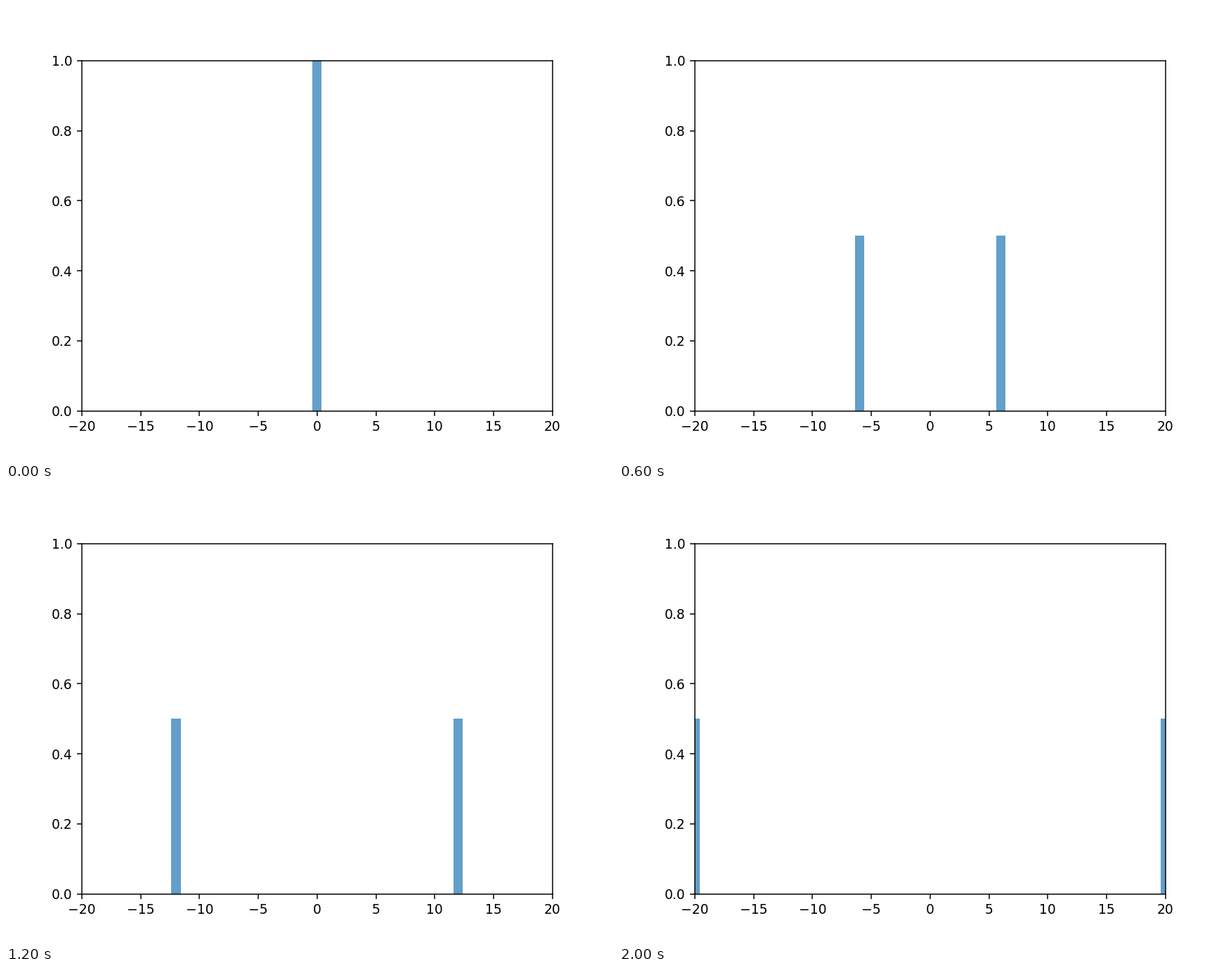
A matplotlib script that plays this animation: 864x648 px, repeating every 2.1 s.

```python
import matplotlib.pyplot as plt
import numpy as np
from matplotlib.animation import FuncAnimation

REACH = 20
STEPS = REACH + 1

plt.rcParams["font.family"] = "DejaVu Sans"
fig, ax = plt.subplots(figsize=(6.4, 4.8), dpi=135)
fig.subplots_adjust(left=0.125, right=0.9, bottom=0.11, top=0.88)

sites = np.arange(-REACH, REACH + 1)
bars = ax.bar(sites, np.zeros(sites.size), width=0.8, color="#1f77b4", alpha=0.7)
ax.set_xlim(-REACH, REACH)
ax.set_ylim(0, 1)
ax.set_xticks(range(-REACH, REACH + 1, 5))


def probability(step):
    """Half the weight travels left and half right, one site per step."""
    return 0.5 * (sites == -step) + 0.5 * (sites == step)


def update(step):
    for bar, p in zip(bars, probability(step)):
        bar.set_height(p)
        bar.set_visible(p > 0)
    return list(bars)


anim = FuncAnimation(fig, update, frames=STEPS, interval=100,
                     repeat=True, repeat_delay=0, blit=False)
plt.show()
```
